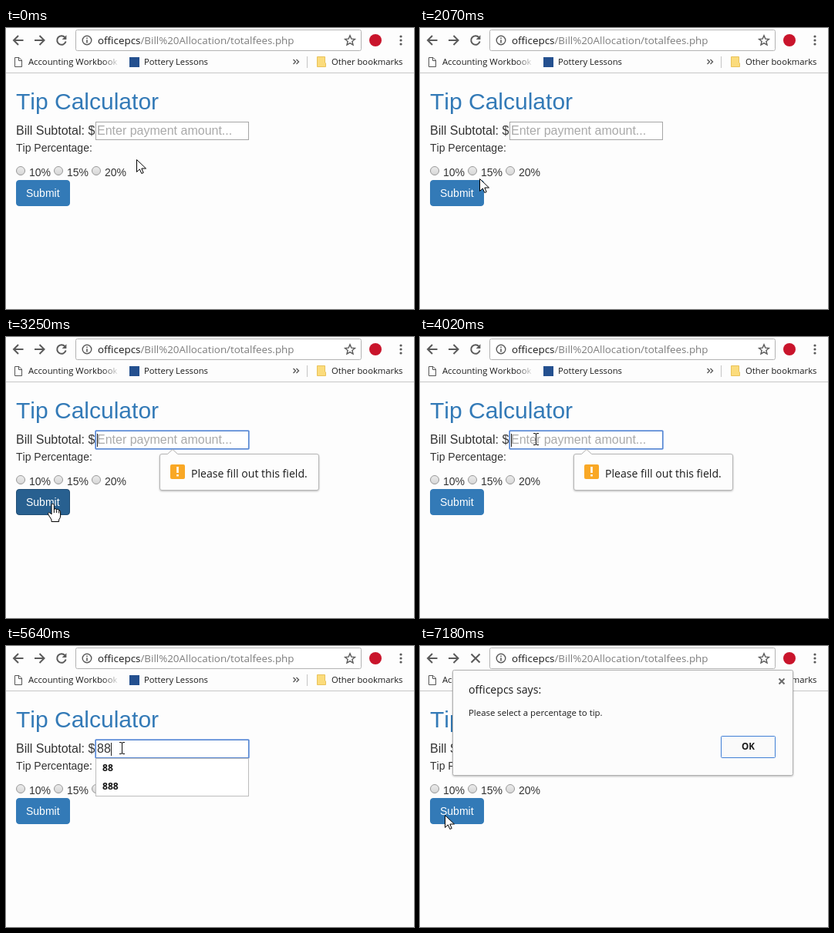
An HTML page for the animation above (8000 ms loop, 529 by 366 pixels).

```html
<!DOCTYPE html>
<html lang="en">
<head>
<meta charset="utf-8">
<title>Tip Calculator</title>
<style>
html, body { margin: 0; width: 100%; height: 100%; overflow: hidden; background: #fdfdfd; }
svg { display: block; width: 100%; height: 100%; }
text { white-space: pre; font-kerning: none; }
.ui { font-family: "Open Sans", "Noto Sans", sans-serif; font-size: 11.25px; fill: #1a1a1a; }
.page { font-family: "Liberation Sans", Arial, sans-serif; font-size: 14px; fill: #333; }
.big { font-size: 16px; }
.icon { fill: none; stroke: #5a5a5a; stroke-width: 2; }
.focus { fill: none; stroke: #5585d0; }
.focus :first-child { stroke: #8fb1e8; }

/* every part holds its state until the next key */
.k { animation: 8s step-end infinite; }

#cursor { animation-name: cursor; }
@keyframes cursor {
  0%, 17.5% { transform: translate(170px, 171px); }
  19.375% { transform: translate(169px, 161px); }
  20.875% { transform: translate(146px, 167px); }
  22.375% { transform: translate(121px, 174px); }
  24.25% { transform: translate(99px, 186px); }
  25.875% { transform: translate(78px, 196px); }
  27.625% { transform: translate(66px, 208px); }
  29.125% { transform: translate(61px, 217px); }
  43.75% { transform: translate(85px, 190px); }
  45.25% { transform: translate(124px, 155px); }
  46.75% { transform: translate(148px, 137px); }
  48.625% { transform: translate(151px, 133px); }
  50.25% { transform: translate(150px, 133px); }
  75.875% { transform: translate(118px, 158px); }
  77.375% { transform: translate(74px, 190px); }
  78.875% { transform: translate(35px, 211px); }
  80.75%, to { transform: translate(33px, 220px); }
}
#arrow { animation-name: arrow; }
@keyframes arrow {
  0%, 19.375%, 43.75%, 75.875%, 85.875%, to { opacity: 1; }
  17.5%, 27.625%, 46.75%, 78.875% { opacity: 0; }
}
#hand { animation-name: hand; }
@keyframes hand {
  0%, 43.75%, 85.875%, to { opacity: 0; }
  27.625%, 78.875% { opacity: 1; }
}
#beam { animation-name: beam; }
@keyframes beam {
  0%, 75.875%, to { opacity: 0; }
  46.75% { opacity: 1; }
}

#button { animation-name: button; }
@keyframes button {
  0%, 43.75%, 87.75%, to { fill: #337ab7; stroke: #337ab7; }
  27.625%, 78.875% { fill: #286090; stroke: #204d74; }
  85.875% { fill: #204d74; stroke: #122b40; }
}
#glow { animation-name: glow; }
@keyframes glow {
  0%, 87.75%, to { opacity: 0; }
  85.875% { opacity: 1; }
}

#ring { animation-name: ring; }
@keyframes ring {
  0%, 85.875%, to { opacity: 0; }
  37.25% { opacity: 1; }
}
#caret { animation-name: blink, caret; }
@keyframes blink {
  0%, 43.75%, 55.25%, 77.375%, 85.875%, to { opacity: 0; }
  37.25%, 48.625%, 64%, 83.875% { opacity: 1; }
}
@keyframes caret {
  0% { transform: none; }
  67.5% { transform: translateX(9px); }
  70.5%, to { transform: translateX(18px); }
}
#hint { animation-name: hint; }
@keyframes hint {
  0% { opacity: 1; }
  67.5%, to { opacity: 0; }
}
#one { animation-name: one; }
@keyframes one {
  0%, 70.5%, to { opacity: 0; }
  67.5% { opacity: 1; }
}
#two { animation-name: two; }
@keyframes two {
  0% { opacity: 0; }
  70.5%, to { opacity: 1; }
}
#list3 { animation-name: list3; }
@keyframes list3 {
  0%, 70.5%, to { opacity: 0; }
  69% { opacity: 1; }
}
#list2 { animation-name: list2; }
@keyframes list2 {
  0%, 85.875%, to { opacity: 0; }
  70.5% { opacity: 1; }
}
.list rect { fill: #fff; stroke: #bdbdbd; }
.list text { font-weight: 700; font-size: 12.1px; fill: #111; }

#bubble { animation-name: bubble; transform-origin: 302.5px 176px; filter: drop-shadow(0 1px 1px #0004); }
@keyframes bubble {
  0%, 67.5%, to { opacity: 0; transform: scale(.955); }
  37.25% { opacity: .2; transform: scale(.955); }
  38.75% { opacity: .75; transform: scale(.985); }
  40.625% { opacity: 1; transform: none; }
}

#reload { animation-name: reload; }
@keyframes reload {
  0% { opacity: 1; }
  87.75%, to { opacity: 0; }
}
#stop { animation-name: stop; }
@keyframes stop {
  0% { opacity: 0; }
  87.75%, to { opacity: 1; }
}
#dialog { animation-name: dialog; transform-origin: 263px 100px; filter: drop-shadow(0 1px 1px #0004); }
@keyframes dialog {
  0% { opacity: 0; transform: scale(.977); }
  87.75% { opacity: .4; transform: scale(.977); }
  89.75%, to { opacity: 1; transform: none; }
}
</style>
</head>
<body>
<svg viewBox="0 0 529 366">
  <defs>
    <linearGradient id="fade" gradientUnits="userSpaceOnUse" x1="126" x2="147" y1="0" y2="0">
      <stop offset="0" stop-color="#1a1a1a"/>
      <stop offset="1" stop-color="#1a1a1a" stop-opacity="0"/>
    </linearGradient>
    <linearGradient id="dot" x2="0" y2="1">
      <stop offset="0" stop-color="#ececec"/>
      <stop offset="1" stop-color="#d6d6d6"/>
    </linearGradient>
    <circle id="radio" r="5.5" fill="url(#dot)" stroke="#999"/>
  </defs>

  <!-- browser bars -->
  <g class="ui">
    <rect y="58" width="529" height="1" fill="#c6c6c6"/>
    <path class="icon" d="M22.5 16H10.5M16 10L10 16L16 22"/>
    <path class="icon" d="M37 16H49M43.5 10L49.5 16L43.5 22"/>
    <g id="reload" class="k">
      <path class="icon" d="M76.4 12.2A5.8 5.8 0 1 0 77.6 17.6"/>
      <path d="M78.4 9.2V15H72.6Z" fill="#5a5a5a"/>
    </g>
    <path id="stop" class="k icon" d="M66.5 10.5L77.5 21.5M77.5 10.5L66.5 21.5"/>
    <rect x="90.5" y="2.5" width="370" height="27" rx="2" fill="#fff" stroke="#b3b3b3"/>
    <circle class="icon" cx="105" cy="16" r="5.8" style="stroke-width:1.4"/>
    <path d="M104.2 12.4h1.6v1.6h-1.6zM104.2 15.2h1.6v4.4h-1.6z" fill="#5a5a5a"/>
    <text x="119" y="21" font-size="13.4">officepcs<tspan fill="#7d7d7d">/Bill%20Allocation/totalfees.php</tspan></text>
    <path class="icon" style="stroke-width:1.4" d="M446 9.8L447.8 14.1L452.4 14.5L448.9 17.5L450 22L446 19.6L442 22L443.1 17.5L439.6 14.5L444.2 14.1Z"/>
    <circle cx="479" cy="16" r="8" fill="#c9142b"/>
    <g fill="#5a5a5a">
      <circle cx="512" cy="11" r="1.6"/><circle cx="512" cy="16" r="1.6"/><circle cx="512" cy="21" r="1.6"/>
    </g>

    <path d="M11.5 38.5H17L20.5 42V50.5H11.5ZM16.5 38.5V42.5H20.5" fill="#fff" stroke="#555"/>
    <text x="29" y="48" style="fill:url(#fade)">Accounting Workbook Guide</text>
    <rect x="160" y="38" width="13" height="13" fill="#24508f"/>
    <text x="179" y="48">Pottery Lessons</text>
    <path class="icon" style="stroke-width:1.4" d="M372.5 41L375.5 44L372.5 47M376.5 41L379.5 44L376.5 47"/>
    <rect x="390" y="37" width="1" height="15" fill="#c4c4c4"/>
    <path d="M403.5 37.5H413.5V45L414.5 46V50.5H403.5Z" fill="#fbdc7c" stroke="#e9c25a"/>
    <text x="422" y="48">Other bookmarks</text>
  </g>

  <!-- form -->
  <g class="page">
    <text x="13" y="106" font-size="30" fill="#337ab7">Tip Calculator</text>
    <text class="big" x="13" y="139">Bill Subtotal: $</text>
    <text x="13" y="161">Tip Percentage:</text>
    <use href="#radio" x="19" y="186"/><text x="30" y="193">10%</text>
    <use href="#radio" x="68" y="186"/><text x="79" y="193">15%</text>
    <use href="#radio" x="117" y="186"/><text x="128" y="193">20%</text>

    <rect x="116.5" y="122.5" width="198" height="23" fill="#fff" stroke="#a6a6a6"/>
    <g id="ring" class="k focus">
      <rect x="115.5" y="121.5" width="200" height="25" rx="1.5"/>
      <rect x="116.5" y="122.5" width="198" height="23"/>
    </g>
    <text id="hint" class="k big" x="118" y="139" fill="#a9a9a9">Enter payment amount...</text>
    <text id="one" class="k big" x="118" y="139">8</text>
    <text id="two" class="k big" x="118" y="139">88</text>
    <rect id="caret" class="k" x="118" y="126" width="1" height="17" fill="#222"/>

    <rect id="button" class="k" x="13.5" y="198.5" width="69" height="33" rx="3.5"/>
    <g id="glow" class="k focus">
      <rect x="12.5" y="197.5" width="71" height="35" rx="2"/>
      <rect x="13.5" y="198.5" width="69" height="33" rx="1.5"/>
    </g>
    <text x="26" y="220" fill="#fff">Submit</text>
  </g>

  <!-- suggestions -->
  <g id="list3" class="k ui list">
    <rect x="116.5" y="146.5" width="198" height="73"/>
    <text x="125" y="163">8</text><text x="125" y="187">88</text><text x="125" y="211">888</text>
  </g>
  <g id="list2" class="k ui list">
    <rect x="116.5" y="146.5" width="198" height="49"/>
    <text x="125" y="163">88</text><text x="125" y="187">888</text>
  </g>

  <!-- validation bubble -->
  <g id="bubble" class="k ui">
    <path d="M202 152.5H209.5L216 146.5L222.5 152.5H403Q405.5 152.5 405.5 155V197Q405.5 199.5 403 199.5H202Q199.5 199.5 199.5 197V155Q199.5 152.5 202 152.5Z" fill="#fdfdfd" stroke="#b5b5b5"/>
    <rect x="213" y="166" width="19" height="19" rx="2" fill="#f9a825"/>
    <path d="M221.2 169h2.6v8h-2.6zM221.2 179h2.6v2.6h-2.6z" fill="#fff"/>
    <text x="240" y="183" font-size="14.1">Please fill out this field.</text>
  </g>

  <!-- alert -->
  <g id="dialog" class="k ui">
    <rect x="42.5" y="31.5" width="441" height="137" rx="2" fill="#fcfcfc" stroke="#b0b0b0"/>
    <text x="63" y="62" font-size="14.1">officepcs says:</text>
    <text x="63" y="91" font-size="11.4">Please select a percentage to tip.</text>
    <path class="icon" style="stroke:#6a6a6a" d="M465.5 42.5L472.5 49.5M472.5 42.5L465.5 49.5"/>
    <rect x="390.5" y="117.5" width="70" height="28" rx="1" fill="#fafafa" stroke="#3f7fd6"/>
    <text x="425.5" y="135" font-size="11.6" font-weight="700" text-anchor="middle">OK</text>
  </g>

  <!-- pointer -->
  <g id="cursor" class="k">
    <path id="arrow" class="k" d="M-.5 .5V16.5L3.3 12.9L5.8 18.5L8.2 17.5L5.8 12H11.5Z" fill="#fff" stroke="#000"/>
    <g id="hand" class="k" stroke="#000">
      <path d="M-2 1.5Q-2 .3 -.4 .3T1.3 1.8V8Q1.3 6.6 3 6.7T4.7 8.3Q5 7.2 6.4 7.4T7.7 9.2Q9.6 8.4 9.6 10.8V16Q9.6 19 7.6 21V23.5H-2V21L-6 14.5Q-7 12 -5.5 11.6Q-4 11.4 -2 14Z" fill="#fff"/>
      <path d="M1.3 8V12M4.7 8.5V12M7.7 9.5V12.5" fill="none"/>
    </g>
    <path id="beam" class="k" d="M-3 -7.5H-1Q.5 -7.5 .5 -6V6Q.5 7.5 -1 7.5H-3M4 -7.5H2Q.5 -7.5 .5 -6M4 7.5H2Q.5 7.5 .5 6" fill="none" stroke="#111"/>
  </g>
</svg>
</body>
</html>
```
